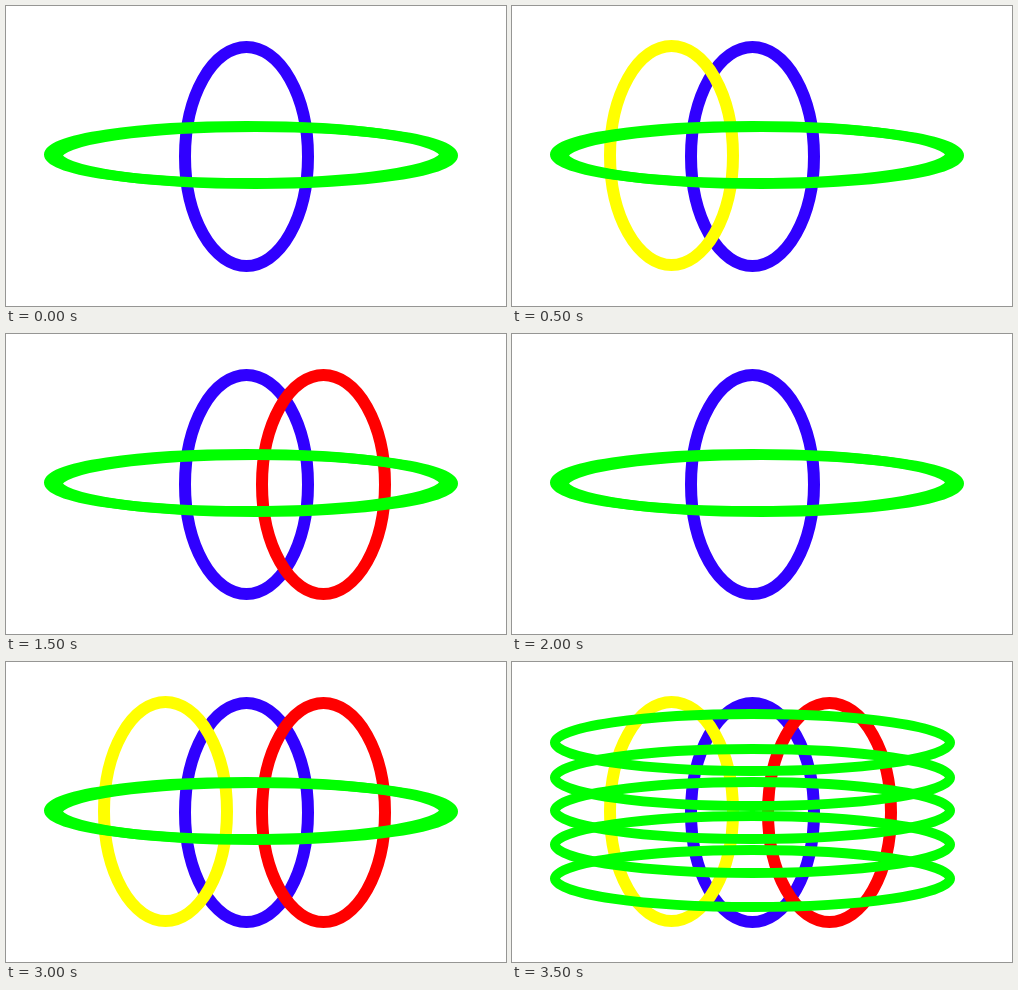
Animation of 500x300 px, one loop 4000 ms. Source, as an HTML page with a canvas:

```html
<!DOCTYPE html>
<html lang="en">
<head>
<meta charset="utf-8">
<title>Rings</title>
<style>
html, body { margin: 0; width: 100%; height: 100%; overflow: hidden; background: #fff; }
canvas { display: block; }
</style>
</head>
<body>
<canvas id="stage" width="500" height="300"></canvas>
<script>
const ctx = document.getElementById('stage').getContext('2d');
const STEP = 500;

// Upright rings visible in each step; the last step also fans out the flat rings.
const steps = ['b', 'by', 'byr', 'br', 'b', '', 'byr', 'byr'];
const upright = {
  b: { x: 240.5, y: 150.5, color: '#3000ff' },
  y: { x: 159.5, y: 149.5, color: '#ffff00' },
  r: { x: 317.5, y: 150.5, color: '#ff0000' }
};

function ring(x, y, rx, ry, width, color) {
  ctx.beginPath();
  ctx.ellipse(x, y, rx, ry, 0, 0, Math.PI * 2);
  ctx.lineWidth = width;
  ctx.strokeStyle = color;
  ctx.stroke();
}

function flatRing(x, y) {
  ring(x, y, 197.5, 28.5, 10, '#00ff00');
}

function draw(step) {
  ctx.fillStyle = '#fff';
  ctx.fillRect(0, 0, 500, 300);
  for (const key of steps[step]) {
    const { x, y, color } = upright[key];
    ring(x, y, 61.5, 109.5, 12, color);
  }
  if (step === steps.length - 1) {
    for (const y of [80.5, 115.5, 148.5, 182.5, 216.5]) flatRing(240.5, y);
  } else {
    // Two slightly shifted rings give the thick, pointed ends.
    flatRing(240.5, 148.5);
    flatRing(249.5, 149.5);
  }
}

const start = performance.now();
function tick() {
  const elapsed = performance.now() - start;
  draw(Math.floor(elapsed / STEP) % steps.length);
  requestAnimationFrame(tick);
}
tick();
</script>
</body>
</html>
```
